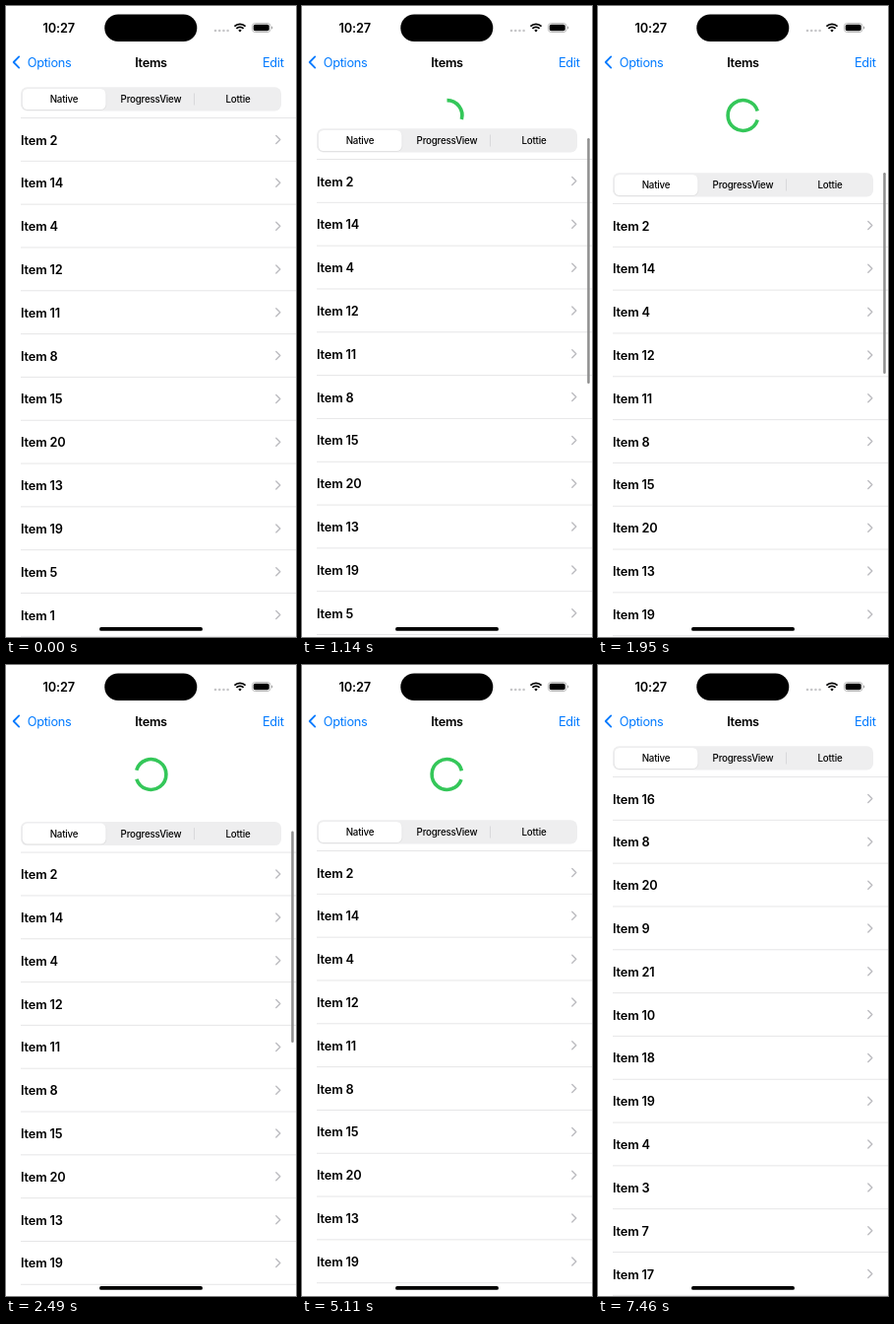
Write an HTML page that moves like this. It is 295 by 640 pixels and loops after 8 s.

```html
<!DOCTYPE html>
<html lang="en">
<head>
<meta charset="utf-8">
<title>Pull to refresh</title>
<style>
  html, body { margin: 0; width: 100%; height: 100%; overflow: hidden; background: #fff; }
  svg { display: block; width: 295px; height: 640px; }
  text { font: 12.76px Inter, Roboto, sans-serif; letter-spacing: -.3px; }
  .bold { font-weight: 600; }
  .mid { text-anchor: middle; }
  .row { font-weight: 600; letter-spacing: -.15px; }
  .tab { font-size: 9.76px; font-weight: 500; letter-spacing: -.2px; text-anchor: middle; }
  .line { fill: none; stroke-linecap: round; stroke-linejoin: round; }
  .blue { fill: #007aff; }
</style>
</head>
<body>
<svg viewBox="0 0 295 640">
  <path id="spinner" fill="none" stroke="#34c759" stroke-width="3.6"/>

  <g id="content">
    <rect x="15" y="82.3" width="265" height="24.2" rx="6.5" fill="#eeeeef"/>
    <rect x="16.2" y="84.3" width="86" height="21.4" rx="5.4" fill="#000" opacity=".07"/>
    <rect x="16.6" y="83.9" width="85" height="21" rx="5.2" fill="#fff"/>
    <path d="M191.5 88.5v12" stroke="#d8d8db"/>
    <text class="tab" x="59" y="98">Native</text>
    <text class="tab" x="147.5" y="98">ProgressView</text>
    <text class="tab" x="236" y="98">Lottie</text>
    <g id="rows"></g>
  </g>

  <rect id="bar" x="290.2" width="2.5" rx="1.25" fill="#8e8e8e"/>

  <text class="bold mid" x="53.8" y="26.6" style="letter-spacing:-.1px">10:27</text>
  <rect x="100.3" y="8.5" width="94" height="27.6" rx="13.8"/>
  <g fill="#c6c6c8">
    <circle cx="213" cy="25" r="1.3"/><circle cx="217.2" cy="25" r="1.3"/>
    <circle cx="221.4" cy="25" r="1.3"/><circle cx="225.6" cy="25" r="1.3"/>
  </g>
  <g fill="none" stroke="#000" stroke-width="1.8">
    <path d="M232.4 20.7a8 8 0 0 1 11.2 0M234.4 22.9a5.1 5.1 0 0 1 7.2 0"/>
    <path d="M238 26.6l-1.7-1.9a2.4 2.4 0 0 1 3.4 0z" fill="#000" stroke="none"/>
  </g>
  <rect x="250.4" y="17.5" width="18.6" height="9" rx="3" fill="none" stroke="#a9a9a9" stroke-width=".8"/>
  <rect x="251.7" y="18.8" width="16" height="6.4" rx="1.8"/>
  <path d="M270 20.6q1.3 .3 1.3 1.4t-1.3 1.4z" fill="#a9a9a9"/>

  <path class="line" d="M13.2 51.4L7.7 57l5.5 5.6" stroke="#007aff" stroke-width="1.8"/>
  <text class="blue" x="21.8" y="61.6">Options</text>
  <text class="bold mid" x="147.5" y="61.6">Items</text>
  <text class="blue" x="261" y="61.6">Edit</text>
  <rect x="95" y="630" width="105" height="3.8" rx="1.9"/>
</svg>
<script>
const $ = id => document.getElementById(id);
const LOOP = 8000, REST = 75, PITCH = 43.82;
const SPIN_START = 1638, RELEASE = 1630, DONE = 6640;
const before = [2, 14, 4, 12, 11, 8, 15, 20, 13, 19, 5, 1];
const after = [16, 8, 20, 9, 21, 10, 18, 19, 4, 3, 7, 17];

// The screen is refreshed in bursts: first time, last time, count
const bursts = [[500, 940, 5], [1140, 1140, 1], [1310, 1950, 7], [2130, 2930, 8], [3030, 3790, 8],
  [3890, 4660, 8], [4770, 5560, 8], [5660, 6460, 8], [6580, 7350, 8], [7460, 7460, 1]];
const ticks = [0];
for (const [from, to, n] of bursts)
  for (let i = 0; i < n; i++) ticks.push(from + (n > 1 ? (to - from) * i / (n - 1) : 0));

// Finger drag: time, distance
const drag = [[390, 0], [500, 1], [720, 8], [940, 19], [1140, 42], [1310, 66], [1420, 92], [1520, 110], [1630, 117]];

$('rows').innerHTML = before.map((_, i) => {
  const y = 113.5 + i * PITCH;
  return `<path d="M15 ${y}H295" stroke="#e4e4e5" stroke-width=".9"/>
    <text class="row" x="15" y="${y + 27}"></text>
    <path class="line" d="M274.8 ${y + 18}l4 4-4 4" stroke="#bcbcc0" stroke-width="1.4"/>`;
}).join('') + `<path d="M15 ${113.5 + 12 * PITCH}H295" stroke="#e4e4e5" stroke-width=".9"/>`;
const labels = [...document.querySelectorAll('.row')];

function pullAt(t) {
  if (t < 500 || t >= 7460) return 0;
  if (t >= DONE) {
    const s = 11 * (t - DONE) / 1000;
    return REST * (1 + s) * Math.exp(-s);
  }
  if (t >= RELEASE) return REST + 12 * Math.exp((1950 - t) / 260);
  const i = drag.findIndex(k => k[0] > t);
  const [t0, a] = drag[i - 1], [t1, b] = drag[i];
  return a + (b - a) * (t - t0) / (t1 - t0);
}

// Angles in degrees, clockwise from the top
function arc(start, sweep) {
  if (sweep < 1) return '';
  const point = deg => {
    const r = deg * Math.PI / 180;
    return `${147.5 + 15.4 * Math.sin(r)} ${111 - 15.4 * Math.cos(r)}`;
  };
  return `M${point(start)}A15.4 15.4 0 ${sweep > 180 ? 1 : 0} 1 ${point(start + sweep)}`;
}

function draw(t) {
  const pull = pullAt(t);
  $('content').setAttribute('transform', `translate(0 ${pull})`);

  const spinning = t >= SPIN_START && t < DONE;
  $('spinner').setAttribute('d', spinning ? arc((t - SPIN_START) * .3428, 326) : arc(0, pull * 2.5));

  $('bar').setAttribute('y', 92 + Math.min(pull, 77));
  $('bar').setAttribute('height', 291 - pull);
  $('bar').setAttribute('opacity', t < 500 ? 0 : Math.max(0, Math.min(1, (3850 - t) / 400)));

  const items = t < DONE ? before : after;
  labels.forEach((label, i) => label.textContent = 'Item ' + items[i]);
}

const origin = performance.now();
function frame() {
  const t = (performance.now() - origin) % LOOP;
  draw(ticks.findLast(tick => tick <= t));
  requestAnimationFrame(frame);
}
frame();
</script>
</body>
</html>
```
